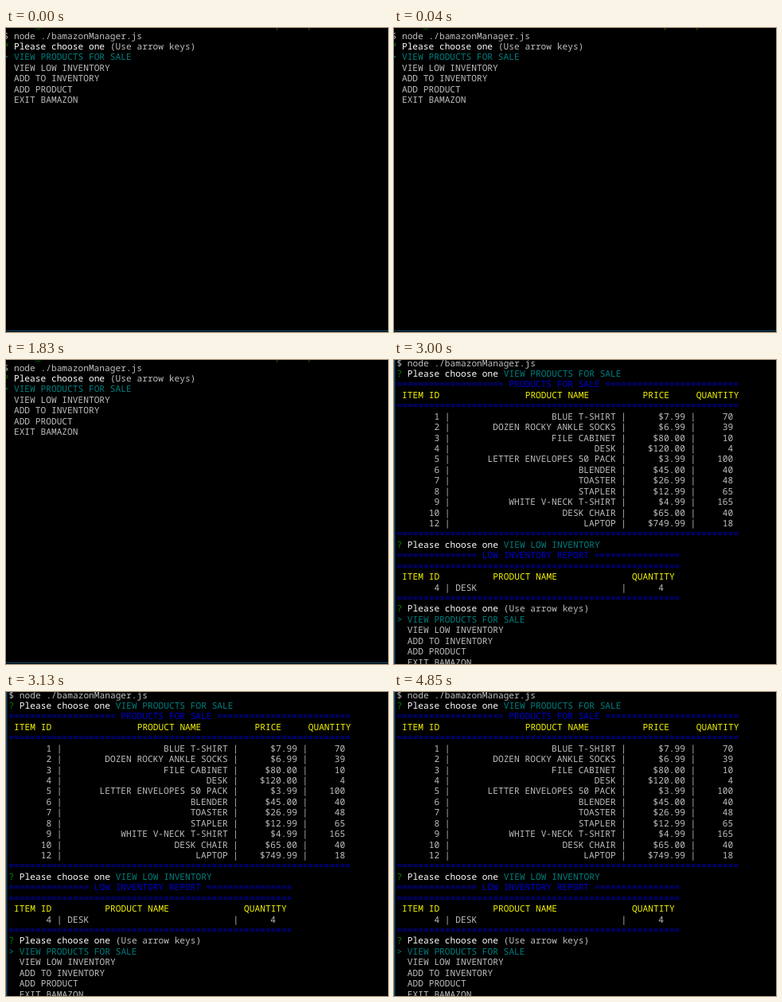
Recreate the animation shown at these times as an HTML page with a canvas. Size 480 by 382 pixels, loop 5990 ms.

```html
<!DOCTYPE html>
<html lang="en">
<head>
<meta charset="utf-8">
<title>Inventory manager terminal</title>
<style>
  html, body { margin: 0; width: 100%; height: 100%; overflow: hidden; background: #000; }
  canvas { display: block; }
</style>
</head>
<body>
<canvas id="screen" width="480" height="382"></canvas>
<script>
const ctx = document.getElementById('screen').getContext('2d');
const LOOP = 5990, SWITCH = 3000;
const CELL = 6.72, LINE = 13.43;
const GREY = '#bfbfbf', WHITE = '#fff', CYAN = '#008080', GREEN = '#008000',
      BLUE = '#0000d0', YELLOW = '#f4f400', EDGE = '#124a6c';

const MENU = ['VIEW PRODUCTS FOR SALE', 'VIEW LOW INVENTORY', 'ADD TO INVENTORY',
              'ADD PRODUCT', 'EXIT BAMAZON'];
const PRODUCTS = [
  [1, 'BLUE T-SHIRT', '$7.99', 70],
  [2, 'DOZEN ROCKY ANKLE SOCKS', '$6.99', 39],
  [3, 'FILE CABINET', '$80.00', 10],
  [4, 'DESK', '$120.00', 4],
  [5, 'LETTER ENVELOPES 50 PACK', '$3.99', 100],
  [6, 'BLENDER', '$45.00', 40],
  [7, 'TOASTER', '$26.99', 48],
  [8, 'STAPLER', '$12.99', 65],
  [9, 'WHITE V-NECK T-SHIRT', '$4.99', 165],
  [10, 'DESK CHAIR', '$65.00', 40],
  [12, 'LAPTOP', '$749.99', 18]
];

let left = 0, firstBaseline = 0;

function put(row, col, text, color = GREY) {
  ctx.fillStyle = color;
  ctx.fillText(text, left + col * CELL, Math.floor(firstBaseline + row * LINE));
}

function bar(x, y, w, h, color) {
  ctx.fillStyle = color;
  ctx.fillRect(x, y, w, h);
}

function begin(x, baseline) {
  bar(0, 0, 480, 382, '#000');
  ctx.font = '11.2px "Noto Sans Mono", monospace';
  ctx.textRendering = 'geometricPrecision';
  left = x;
  firstBaseline = baseline;
  put(0, 0, '$ node ./bamazonManager.js');
}

function question(row, answer, color = CYAN) {
  put(row, 0, '?', GREEN);
  put(row, 2, 'Please choose one', WHITE);
  put(row, 20, answer, color);
}

function menu(row) {
  question(row, '(Use arrow keys)', GREY);
  put(row + 1, 0, '>', CYAN);
  MENU.forEach((item, i) => put(row + 1 + i, 2, item, i ? GREY : CYAN));
}

const rule = (row, width) => put(row, 0, '='.repeat(width), BLUE);

function title(row, before, text, after) {
  put(row, 0, '='.repeat(before) + ' ' + text + ' ' + '='.repeat(after), BLUE);
}

function header(row, nameCol, quantityCol) {
  put(row, 1, 'ITEM ID', YELLOW);
  put(row, nameCol, 'PRODUCT NAME', YELLOW);
  put(row, quantityCol, 'QUANTITY', YELLOW);
}

function drawStart() {
  begin(-3.5, 14.05);
  // Lower edge of the prompt line that has scrolled away
  put(-1, 6, '_', '#006000');
  for (const col of [28, 37, 43, 64]) put(-1, col, '/', '#505000');
  for (const col of [51, 57]) put(-1, col, 'p', '#505000');
  menu(1);
  bar(0, 380, 480, 1, EDGE);
}

function drawReports() {
  begin(3.4, 8);
  question(1, MENU[0]);
  title(2, 20, 'PRODUCTS FOR SALE', 25);
  header(3, 24, 56);
  put(3, 46, 'PRICE', YELLOW);
  rule(4, 64);
  PRODUCTS.forEach(([id, name, price, quantity], i) => {
    put(5 + i, 0, String(id).padStart(8) + ' |' + name.padStart(31) + ' |' +
      price.padStart(11) + ' |' + String(quantity).padStart(7));
  });
  rule(16, 64);

  question(17, MENU[1]);
  title(18, 15, 'LOW INVENTORY REPORT', 16);
  rule(19, 53);
  header(20, 18, 44);
  put(21, 7, '4 | ' + 'DESK'.padEnd(31) + '|' + '4'.padStart(7));
  rule(22, 53);
  menu(23);
  bar(0, 0, 1.5, 382, EDGE);
}

function frame(now) {
  if (now % LOOP < SWITCH) drawStart();
  else drawReports();
  requestAnimationFrame(() => frame(performance.now() - start));
}

const start = performance.now();
frame(0);
</script>
</body>
</html>
```
